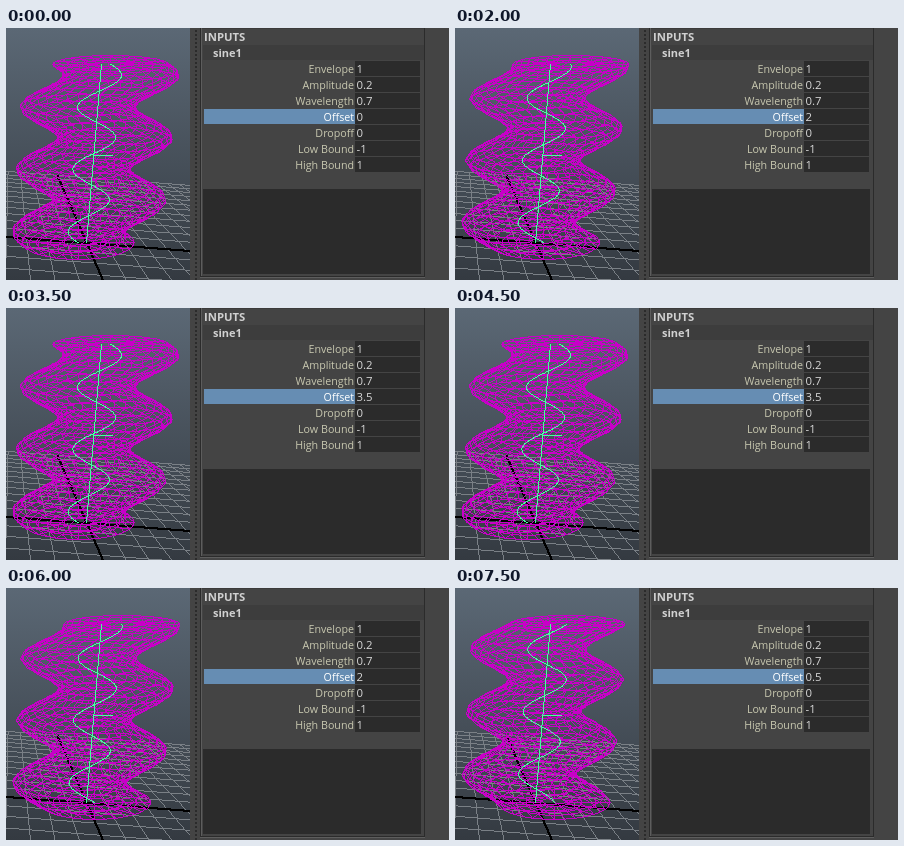
An HTML page with a canvas for the animation above (8000 ms loop, 443 px wide and 252 px high).

```html
<!DOCTYPE html>
<html lang="en">
<head>
<meta charset="utf-8">
<title>Sine deformer offset</title>
<style>
html, body { margin: 0; width: 100%; height: 100%; overflow: hidden; background: #444; }
canvas { display: block; }
</style>
</head>
<body>
<canvas id="stage" width="443" height="252"></canvas>
<script>
const ctx = document.getElementById('stage').getContext('2d');
const TAU = Math.PI * 2;
const VIEW = 184;
const STEP = 500, STEPS = 16;
const AMPLITUDE = 0.2, WAVELENGTH = 0.7;
const MAGENTA = '#c800c8', GREEN = '#48ffa4';
const FONT = '"Open Sans", "Noto Sans", sans-serif';

const mix = (a, b, k) => a + (b - a) * k;

function box(color, x, y, w, h) {
  ctx.fillStyle = color;
  ctx.fillRect(x, y, w, h);
}

// Hard-edged line, as a 3D viewport draws it.
function line([x0, y0], [x1, y1], size = 1) {
  const n = Math.max(1, Math.ceil(Math.max(Math.abs(x1 - x0), Math.abs(y1 - y0))));
  for (let i = 0; i <= n; i++) {
    const x = Math.round(mix(x0, x1, i / n)), y = Math.round(mix(y0, y1, i / n));
    if (x >= 0 && x < VIEW && y >= 0 && y < 252) ctx.fillRect(x, y, size, size);
  }
}

function polyline(count, point) {
  let last = point(0);
  for (let i = 1; i <= count; i++) {
    const next = point(i / count);
    line(last, next);
    last = next;
  }
}

function text(str, x, y, size, color, align = 'left', weight = 400) {
  ctx.font = `${weight} ${size}px ${FONT}`;
  ctx.textAlign = align;
  ctx.fillStyle = color;
  ctx.fillText(str, x, y);
}

// Ground plane: column i along the main axis, row n away from the camera.
function ground(i, n) {
  const depth = 19, vx = 4, vy = 40;
  const x = 80 + 20 * i, y = 208 + 0.0765 * x;
  const k = depth / (depth + n);
  return [vx + (x - vx) * k, vy + (y - vy) * k];
}

function drawGrid() {
  ctx.fillStyle = '#7a8086';
  for (let n = -6; n <= 12; n++) line(ground(-12, n), ground(12, n));
  for (let i = -12; i <= 12; i++) line(ground(i, -6), ground(i, 12));
  ctx.fillStyle = '#000';
  line(ground(-12, 0), ground(12, 0), 2);
  line(ground(0, -6), ground(0, 12), 2);
}

// v runs from 0 at the top of the deformer to 1 at its bottom.
const axis = v => [mix(95, 80, v), mix(36, 214, v)];

function bend(v, offset) {
  const height = 1 - 2 * v;
  const [x, y] = axis(v);
  const scale = mix(105, 95, v);
  return [x + scale * AMPLITUDE * Math.sin(TAU * (height + offset) / WAVELENGTH), y];
}

function surface(v, turn, offset, r = 1) {
  const [x, y] = bend(v, offset);
  return [
    x + r * mix(58, 56, v) * Math.cos(TAU * turn),
    y + r * mix(9, 17, v) * Math.sin(TAU * turn)
  ];
}

function drawMesh(offset) {
  const rings = 26, columns = 32;
  ctx.fillStyle = MAGENTA;
  for (let i = 0; i <= rings; i++) {
    polyline(columns, k => surface(i / rings, k, offset));
  }
  for (let j = 0; j < columns; j++) {
    polyline(rings, v => surface(v, j / columns, offset));
  }
  for (const v of [0, 1]) {
    for (const r of [0.25, 0.5, 0.75]) polyline(columns, k => surface(v, k, offset, r));
    for (let j = 0; j < columns; j += 2) {
      line(surface(v, j / columns, offset, 0.25), surface(v, j / columns, offset));
    }
  }
}

function drawHandle(offset) {
  ctx.fillStyle = GREEN;
  line(axis(0), axis(1));
  line([88, 127], [106, 127]);
  polyline(120, v => bend(v, offset));
}

function drawView(offset) {
  const sky = ctx.createLinearGradient(0, 0, 0, 252);
  sky.addColorStop(0, '#5b6875');
  sky.addColorStop(1, '#343a41');
  box(sky, 0, 0, VIEW, 252);
  drawGrid();
  drawMesh(offset);
  drawHandle(offset);
}

function drawPanel(offset) {
  box('#444', VIEW, 0, 443 - VIEW, 252);
  for (let y = 2; y < 252; y += 4) box('#2b2b2b', 189, y, 2, 2);
  box('#2b2b2b', 194, 0, 1, 249);
  box('#5d5d5d', 195, 0, 1, 248);
  box('#2b2b2b', 418, 0, 1, 249);
  box('#2b2b2b', 195, 248, 224, 1);
  box('#5d5d5d', 194, 249, 225, 1);
  box('#3b3b3b', 196, 0, 222, 1);
  box('#3d3d3d', 197, 17, 221, 15);
  box('#2b2b2b', 197, 161, 218, 85);
  text('INPUTS', 198, 13, 11.3, '#d0d0d0', 'left', 700);
  text('sine1', 207, 29, 11, '#d0d0d0', 'left', 700);

  const rows = [
    ['Envelope', 1], ['Amplitude', AMPLITUDE], ['Wavelength', WAVELENGTH],
    ['Offset', offset], ['Dropoff', 0], ['Low Bound', -1], ['High Bound', 1]
  ];
  rows.forEach(([label, value], i) => {
    const y = 33 + 16 * i, active = label === 'Offset';
    box('#2b2b2b', 349, y, 65, 15);
    if (active) box('#668db3', 198, y, 151, 15);
    text(label, 348, y + 12, 10.7, active ? '#fff' : '#c8c8b0', 'right');
    text(String(value), 350.5, y + 12, 11.4, '#d8d8d8');
  });
}

let shown = -1;
const start = performance.now();

function frame() {
  const step = Math.floor((performance.now() - start) / STEP) % STEPS;
  if (step !== shown) {
    shown = step;
    const offset = Math.min(step, STEPS - step) / 2;
    drawView(offset);
    drawPanel(offset);
  }
  requestAnimationFrame(frame);
}
frame();
</script>
</body>
</html>
```
